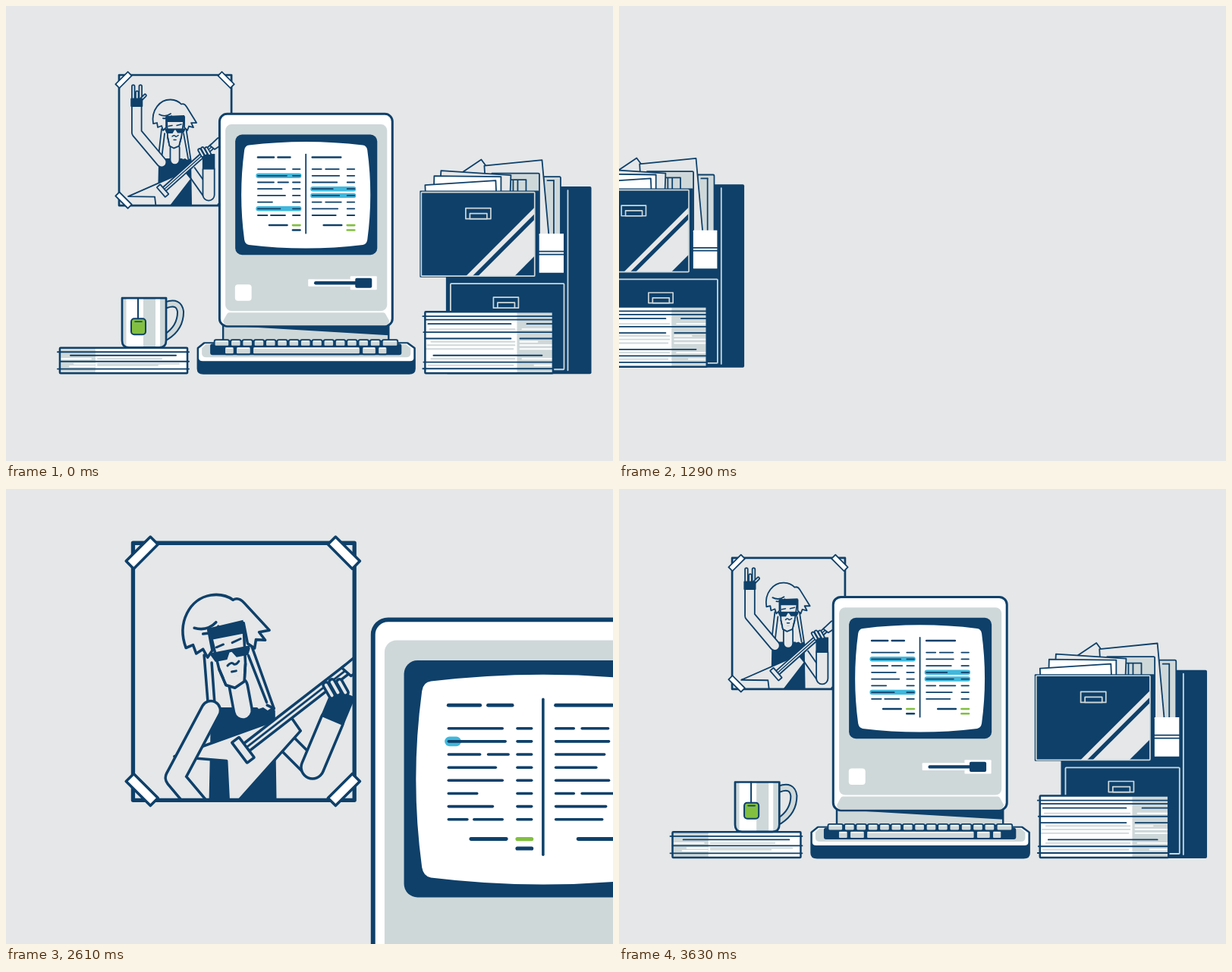
An HTML page with a canvas that plays this animation: 800x600 px, repeating every 3660 ms.

```html
<!DOCTYPE html>
<html lang="en">
<head>
<meta charset="utf-8">
<title>Desk</title>
<style>
html, body { margin: 0; width: 100%; height: 100%; overflow: hidden; background: #e5e7e8; }
canvas { display: block; }
</style>
</head>
<body>
<canvas id="stage" width="800" height="600"></canvas>
<script>
const ctx = document.getElementById('stage').getContext('2d');
const BG = '#e5e7e8', NAVY = '#0e406a', GRAY = '#cfd8d9', WHITE = '#fff', BLUE = '#3fb8dc', GREEN = '#82bf41';
const LOOP = 3660, PAN_END = 1915;

// --- easing ---
const clamp = v => Math.min(1, Math.max(0, v));
const span = (z, start, length) => clamp((z - start) / length);
const outCubic = u => 1 - (1 - u) ** 3;
const inOut = u => u * u * (3 - 2 * u);
const backOut = (u, c) => 1 + (c + 1) * (u - 1) ** 3 + c * (u - 1) ** 2;
const mix = (a, b, u) => a + (b - a) * u;
const rad = deg => deg * Math.PI / 180;

// Cubic bezier (x1, 0, x2, 1) solved by bisection
function bezier(u, x1, x2) {
  let lo = 0, hi = 1;
  for (let i = 0; i < 24; i++) {
    const s = (lo + hi) / 2;
    const x = 3 * s * (1 - s) ** 2 * x1 + 3 * s * s * (1 - s) * x2 + s ** 3;
    if (x < u) lo = s; else hi = s;
  }
  return inOut(lo);
}

// --- drawing helpers ---
function paint(path, fill, stroke, width = 1.8) {
  if (fill) { ctx.fillStyle = fill; ctx.fill(path); }
  if (stroke) { ctx.strokeStyle = stroke; ctx.lineWidth = width; ctx.stroke(path); }
}
const shape = (d, fill, stroke, width) => paint(new Path2D(d), fill, stroke, width);
function box(x1, y1, x2, y2, r, fill, stroke, width) {
  const p = new Path2D();
  p.roundRect(x1, y1, x2 - x1, y2 - y1, r);
  paint(p, fill, stroke, width);
}
function line(x1, y1, x2, y2, color = NAVY, width = 1.8) {
  shape(`M${x1} ${y1}L${x2} ${y2}`, null, color, width);
}
function tube(points, width) {
  const d = 'M' + points.map(p => p.join(' ')).join('L');
  shape(d, null, NAVY, width);
  shape(d, null, BG, width - 3.6);
}
function group(draw) {
  ctx.save();
  draw();
  ctx.restore();
}
function clipBox(x1, y1, x2, y2) {
  ctx.beginPath();
  ctx.rect(x1, y1, x2 - x1, y2 - y1);
  ctx.clip();
}
function turn(x, y, deg) {
  ctx.translate(x, y);
  ctx.rotate(rad(deg));
  ctx.translate(-x, -y);
}

// --- poster ---
function head() {
  shape('M205 162L200 206M209 168L205 201M237 160L244 206M234 168L240 201', null, NAVY);
  shape('M200 206L204 202L206 205M244 206L240 203', null, NAVY);
  shape('M194 155C191 137 203 123 217 123.5Q226 124 231 129.5Q235 128 238 133L251 154H244L247 160L241 158.5L239 164L235 160V146H211V160L207 164L205 158L200 160L199 154Z', BG, NAVY);
  shape('M212 152L213 173L215.5 184.5L221 187.5L228 184.5L231 173L234 152Z', BG, NAVY);
  shape('M211 145L235 144V152.5H211Z', NAVY);
  shape('M202 143Q210 147 217 142M207 148Q214 149 218 145', null, NAVY);
  shape('M208.5 161.5H236V163.5L234 167.5H226L223.5 163.5H222L219.5 168H211.5Z', NAVY);
  shape('M214 158.5L219 157.5M225 157.5L231 156', null, NAVY, 1.5);
  shape('M219 172Q222 169.5 223.5 172Q225 172.5 227 170.5M221 176.5H224', null, NAVY, 1.5);
}

function guitar(k) {
  group(() => {
    ctx.translate(16 * k, -14 * k);
    turn(207, 244, 4 * k);
    shape('M161 251L236 218L244 228L200 285L196 251.5Z', BG, NAVY);
    ctx.lineCap = 'butt';
    tube([[207, 243], [273, 184]], 8);
    line(207, 243, 273, 184, NAVY, 1.4);
    shape('M268.5 184L279 174L291 172L287 181L275 189Z', BG, NAVY);
    turn(206.5, 243.5, -41);
    box(203.5, 235, 209.5, 252, .5, BG, NAVY);
  });
}

function frettingArm(k) {
  const elbow = [267 + 2 * k, 249 - 8 * k], wrist = [267 + 23 * k, 195 - 4 * k];
  const dx = wrist[0] - elbow[0], dy = wrist[1] - elbow[1];
  const mid = [elbow[0] + dx * .62, elbow[1] + dy * .62];
  ctx.lineCap = 'round';
  tube([elbow, mid], 17);
  ctx.lineCap = 'butt';
  line(mid[0], mid[1], ...wrist, NAVY, 16.5);
  ctx.lineCap = 'round';
  for (const [x, y] of [[1, 0], [-4, 0], [-8, 2]])
    tube([[wrist[0] + x, wrist[1] + y], [wrist[0] + x - 4, wrist[1] + y - 7]], 5.6);
}

function raisedArm(z, k) {
  const q = outCubic(span(z, 2620, 745));
  const upper = rad(mix(152, 40, q)), fore = rad(mix(220, 0, q));
  const reach = (p, angle, r) => [p[0] - Math.sin(angle) * r, p[1] - Math.cos(angle) * r];
  const shoulder = [205 - 4 * k, 206 - 3 * k];
  const elbow = reach(shoulder, upper, 51), wrist = reach(elbow, fore, 36);
  ctx.lineCap = 'round';
  tube([shoulder, elbow, wrist], 14.5);
  group(() => {
    ctx.translate(...wrist);
    ctx.rotate(-fore);
    for (const x of [-4.5, .5, 5]) tube([[x, -8], [x, x === .5 ? -17 : -25]], 5.4);
    tube([[6, -8], [11, -13]], 5);
    box(-8, -9.5, 8, 2, 1, NAVY);
  });
}

function rocker(z) {
  const k = 1 - inOut(span(z, 2620, 330));
  ctx.translate(0, 180 * (1 - outCubic(span(z, 2150, 280))));
  ctx.lineCap = 'butt';
  tube([[243, 216], [267 + 2 * k, 250 - 8 * k]], 14);
  ctx.lineCap = 'round';
  group(() => {
    turn(221, 208, -11 * k);
    head();
  });
  shape('M201 206L207 201H232L233 202L236 201L239 203L242 201L244 203L245.5 300H199Z', NAVY);
  ctx.lineCap = 'round';
  tube([[222.5 - 3 * k, 187], [222.5, 203]], 14);
  group(() => {
    turn(221, 208, -11 * k);
    shape('M214 180L215.5 184.5L221 187.5L228 184.5L230 180Z', BG);
    shape('M213 173L215.5 184.5L221 187.5L228 184.5L231 173', null, NAVY);
  });
  guitar(k);
  frettingArm(k);
  raisedArm(z, k);
}

function poster(z) {
  const u = span(z, 1920, 253);
  const top = 91 + 190 * (1 - backOut(u, 1.1));
  const bottom = 263 + 190 * (1 - outCubic(span(z, 1920, 210)));
  if (z > 2150) group(() => {
    clipBox(149, 91, 297, 263);
    rocker(z);
  });
  box(149, top, 297, bottom, 0, null, NAVY, 2.7);
  const tape = outCubic(span(z, 2430, 150));
  if (!tape) return;
  for (const [x, y, deg] of [[155, 97.5, -45], [290, 97.5, 45], [155, 256, 45], [290, 256, -45]])
    group(() => {
      ctx.translate(x, y);
      ctx.rotate(rad(deg));
      ctx.scale(tape, tape);
      box(-11.5, -3.6, 11.5, 3.6, 0, WHITE, NAVY, 1.8);
    });
}

// --- computer ---
const ROWS = [
  [[0, 36]], [[0, 38]], [[0, 21], [26.5, 40]], [[0, 31.5]],
  [[0, 36]], [[0, 19]], [[0, 29.5]], [[0, 12.5], [17, 36]]
];
const ROWS_RIGHT = [
  [[0, 12], [17.5, 35]], [[0, 35.5]], [[0, 32.5]], [[0, 27]],
  [[0, 35.5]], [[0, 12], [17.5, 38]], [[0, 33.5]], [[0, 31]]
];
const rowY = i => 215 + 8.7 * i;

function highlight(z, x, row, start) {
  const w = 60 * span(z, start, 300);
  if (w > 0) box(x, rowY(row) - 3.2, x + w, rowY(row) + 3.2, Math.min(3.2, w / 2), BLUE);
}

function column(x, rows, heads, total, last) {
  for (const [a, b] of heads) line(x + a, 199.5, x + b, 199.5, NAVY, 2.5);
  rows.forEach((parts, i) => {
    for (const [a, b] of [...parts, [46, 55.5]]) line(x + a, rowY(i), x + b, rowY(i), NAVY, 1.8);
  });
  line(x + total, 289, x + 38.5, 289, NAVY, 2.5);
  line(x + 46, 289, x + 55.5, 289, GREEN, 2.6);
  line(x + 46, 295.3, x + 55.5, 295.3, last, 2.6);
}

function computer(z) {
  shape('M286 420H504V442H286Z', GRAY, NAVY, 2.4);
  shape('M286 421H504V434Z', NAVY);
  box(281.3, 142.3, 509, 422, 10, WHITE, NAVY, 3);
  box(289, 156, 502, 402, 8, GRAY);
  shape('M294 404H497Q499 404 500 406L505 415Q504 421 499 421H292Q287 421 286 415L291 406Q292 404 294 404Z', GRAY);
  box(302, 169.5, 489, 328, 9, NAVY);
  shape('M320 183.5Q395 174.5 470 183.5Q475 184 476 190Q484 249 476 308Q475 314 470 314.8Q395 324 320 314.8Q315 314 314 308Q306 249 314 190Q315 184 320 183.5Z', WHITE);
  highlight(z, 329.2, 1, 2556);
  highlight(z, 401, 3, 2841);
  highlight(z, 329.2, 6, 2985);
  highlight(z, 401, 4, 3130);
  column(331.8, ROWS, [[0, 21], [26.5, 42.5]], 15, NAVY);
  column(403.5, ROWS_RIGHT, [[0, 37.5]], 15, GREEN);
  line(395, 195.5, 395, 299.5, NAVY, 1.8);

  box(301.7, 367, 323.5, 388.5, 4, WHITE);
  box(398, 360, 454, 369.5, 1, WHITE);
  box(453.5, 356, 488.5, 374, 1, WHITE);
  line(408, 365, 465, 365, NAVY, 4.4);
  box(460, 358.5, 482, 371.5, 2, NAVY);

  shape('M261 444.5H529L538 451V478Q538 484 531 484H260Q253 484 253 478V451Z', NAVY, NAVY, 3);
  shape('M262 445H528L537 451.5V464Q537 468 532 468H259Q254 468 254 464V451.5Z', WHITE);
  shape('M263 446H527L533 451V458Q533 463 527 463H264Q258 463 258 458V451Z', GRAY);
  box(269, 445, 521, 460, 3, NAVY);
  const key = (x1, x2, y1, y2) => {
    box(x1, y1, x2, y2, 2, GRAY, NAVY, 1.8);
    line(x1 + 2.5, y1 + 2, x2 - 2.5, y1 + 2, WHITE, 1.6);
  };
  for (const [a, b] of [[288, 300.5], [303, 322.5], [325, 466.5], [469, 487.5], [490, 502]]) key(a, b, 449, 459);
  key(274.5, 294, 440, 448.5);
  for (let i = 0; i < 13; i++) key(296 + 15.3 * i, 309.4 + 15.3 * i, 440, 448.5);
  key(495.5, 516, 440, 448.5);
}

// Lines on page edges grow in one after the other
function pageLines(z, lines) {
  lines.forEach(([y, x1, x2, color = NAVY], i) => {
    const g = outCubic(span(z, 2880 + 37 * (i * 5 % 7), 480));
    if (!g) return;
    if (i % 2) line(mix(x2, x1, g), y, x2, y, color, 1.8);
    else line(x1, y, mix(x1, x2, g), y, color, 1.8);
  });
}

// --- mug and books ---
function books(z) {
  box(71, 450.5, 239, 484, 1, WHITE);
  box(72, 451, 118, 483, 0, GRAY);
  pageLines(z, [
    [465, 72, 112, WHITE], [465, 121, 205, GRAY], [471.5, 90, 117, WHITE], [471.5, 121, 228, GRAY],
    [456, 68, 241], [460.5, 85, 224], [468.5, 71, 241], [473.5, 121, 200, GRAY],
    [475, 84, 117, WHITE], [478.3, 68, 241]
  ]);
  box(71, 450.5, 239, 484, 1, null, NAVY, 2.5);

  const handle = 'M211 394Q228 388 230 403Q230 424 211 436';
  shape(handle, null, NAVY, 10);
  shape(handle, null, GRAY, 6);
  const mug = 'M153 385H211V441Q211 450 202 450H162Q153 450 153 441Z';
  shape(mug, WHITE);
  group(() => {
    ctx.clip(new Path2D(mug));
    for (const [a, b] of [[153, 158.5], [181, 197], [203, 211]]) box(a, 385, b, 450, 0, GRAY);
  });
  shape(mug, null, NAVY, 2.7);
  line(174, 385, 174, 412, NAVY, 2);
  box(165, 412, 184, 433, 4, GREEN, NAVY, 2);
  line(170, 416, 179, 416, NAVY, 1.6);
}

// --- cabinet ---
function handle(x, y) {
  box(x, y, x + 33, y + 14, 0, NAVY, GRAY, 1.7);
  box(x + 5.5, y + 7, x + 28, y + 14, 0, NAVY, GRAY, 1.7);
}

function papers(z) {
  clipBox(540, 150, 740, 302);
  ctx.translate(0, 75 * (1 - outCubic(span(z, 2850, 500))));
  shape('M708 225H729Q730.5 225 730.5 227V380H708Z', GRAY, NAVY);
  line(721.5, 230, 721.5, 380);
  line(713, 230, 721.5, 230);
  shape('M600 220L626 202.5L650 235L620 250Z', BG, NAVY);
  shape('M630 210.5L706 203L722 380H640Z', BG, NAVY);
  shape('M640 220.5H701Q702.5 220.5 702.5 222V300H640Z', GRAY, NAVY);
  shape('M660 229H685V300H660ZM668 229V300M674 229V300', GRAY, NAVY);
  shape('M573 217L665 223L662 300H568Z', BG, NAVY);
  shape('M564 224L652 225V300H562Z', WHITE, NAVY);
  shape('M552 236L645 230L648 300H555Z', WHITE, NAVY);
}

function cabinet(z) {
  box(579.5, 238, 771, 485, 2, NAVY);
  line(740, 243, 740, 480, GRAY, 1.8);
  box(585.5, 366, 735, 479, 1, NAVY, GRAY, 1.8);
  handle(642, 384);
  group(() => papers(z));
  box(702, 300, 734.5, 351.5, 0, WHITE);
  line(702, 323.5, 734.5, 323.5);
  line(702, 327.5, 734.5, 327.5);

  box(545, 243.5, 702, 357.5, 1, NAVY);
  group(() => {
    clipBox(547, 245, 696, 356);
    const g = 3 - 57 * Math.exp(-(z - 3030) / 220);
    const stripe = (a, b) => shape(`M${a + g} 356L${a + g + 120} 236H${b + g + 120}L${b + g} 356Z`, BG);
    stripe(606, 614.5);
    stripe(622, 670);
  });
  box(547, 245.5, 696.3, 356, 1, null, GRAY, 1.7);
  handle(605.5, 266.5);

  box(552, 403, 720.5, 484, 1, WHITE);
  box(673, 404, 719.5, 483, 0, GRAY);
  pageLines(z, [
    [409, 549, 720], [413.5, 553, 720], [419, 556, 665], [419, 686, 720], [430, 550, 720],
    [426, 558, 670, GRAY], [426, 680, 720, WHITE], [438.3, 552, 665], [438.3, 677, 720], [442.5, 560, 670, GRAY],
    [442.5, 677, 700, WHITE], [447, 555, 670, GRAY], [447, 677, 719, WHITE], [452, 553, 668, GRAY], [452, 677, 719, WHITE],
    [460.5, 563, 706], [465, 560, 670, GRAY], [465, 680, 719, WHITE], [469.3, 550, 720], [473.5, 696, 718, WHITE],
    [473.5, 556, 668, GRAY], [478, 549, 720]
  ]);
  box(552, 403, 720.5, 484, 1, null, NAVY, 2.5);
}

// --- scene ---
function render(t) {
  const leaving = t < PAN_END;
  const z = leaving ? t + LOOP : t;
  const s = mix(2.97, .978, bezier(span(z, 2118, 1866), .37, 0));
  const pan = leaving ? -820 * bezier(span(t, 160, 1750), .71, .452) : 0;

  ctx.fillStyle = BG;
  ctx.fillRect(0, 0, 800, 600);
  if (z < 1920) return;
  ctx.lineJoin = 'round';

  const layer = (draw, spread = 0, shift = 0) => group(() => {
    ctx.translate(223 + 93 * (s - 1) + pan, 177 + 65.7 * (s - 1));
    ctx.scale(s, s);
    ctx.translate(-223 + spread * Math.max(0, s - 1) + shift, -177);
    ctx.lineCap = 'round';
    draw(z);
  });
  layer(poster);
  if (z > 2130) {
    layer(cabinet, 87);
    layer(books, -24);
    layer(computer, 29, 60 * (1 - outCubic(span(z, 2130, 330))));
  }
}

function tick(now) {
  render(now % LOOP);
  requestAnimationFrame(tick);
}
render(0);
requestAnimationFrame(tick);
</script>
</body>
</html>
```
